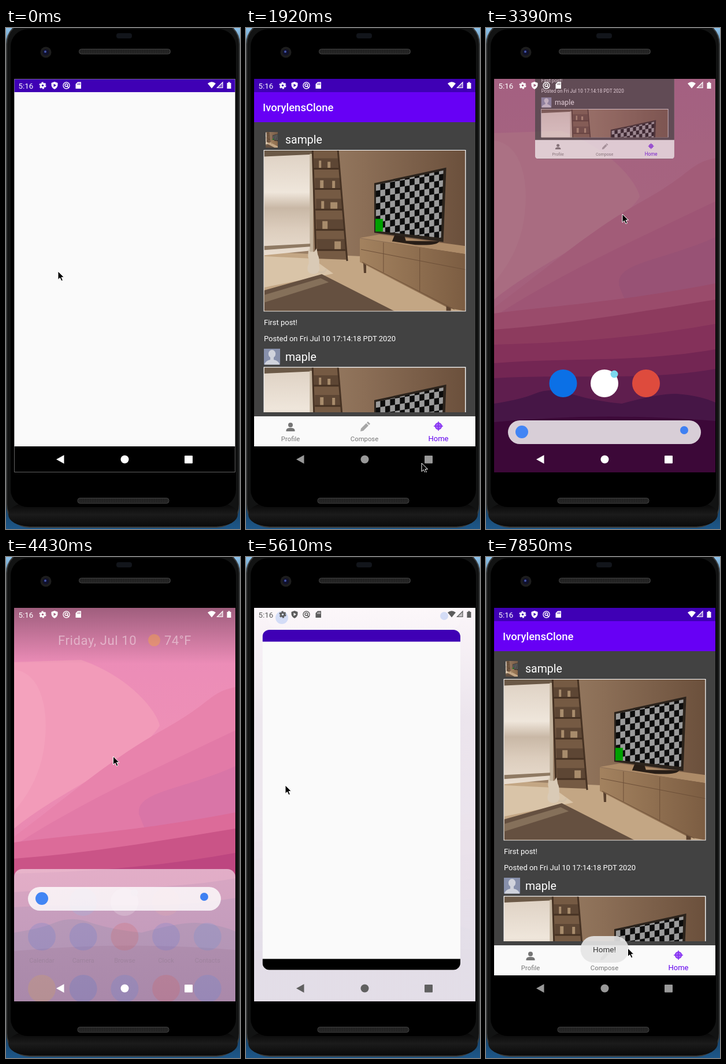
An HTML page for the animation above (8 s loop, 405 by 867 pixels).

```html
<!DOCTYPE html>
<html lang="en">
<head>
<meta charset="utf-8">
<title>Phone screen</title>
<style>
html, body { margin: 0; width: 100%; height: 100%; overflow: hidden; background: #000; }
svg { display: block; font-family: Roboto, sans-serif; }
svg.stage { width: 405px; height: 867px; }
.mid { text-anchor: middle; }
</style>
</head>
<body>
<svg class="stage" viewBox="0 0 405 867">
<defs>
  <linearGradient id="sky" x2="0" y2="1"><stop stop-color="#8fc4ec"/><stop offset=".1" stop-color="#23303a"/><stop offset=".9" stop-color="#14283a"/><stop offset="1" stop-color="#1d5789"/></linearGradient>
  <linearGradient id="chin" x2="0" y2="1"><stop stop-color="#060606"/><stop offset=".5" stop-color="#1b1b1b"/><stop offset="1" stop-color="#0a0a0a"/></linearGradient>
  <linearGradient id="pink" x2="0" y2="1"><stop stop-color="#ea8ab8"/><stop offset=".35" stop-color="#ee90b6"/><stop offset="1" stop-color="#e07aa8"/></linearGradient>
  <linearGradient id="shade" x2="0" y2="1"><stop stop-color="#000" stop-opacity=".32"/><stop offset="1" stop-color="#000" stop-opacity="0"/></linearGradient>
  <linearGradient id="sheet" x2="0" y2="1"><stop stop-color="#fff"/><stop offset=".25" stop-color="#ecebf1"/></linearGradient>
  <linearGradient id="glass" x2="0" y2="1"><stop stop-color="#ddd0c2"/><stop offset=".4" stop-color="#efe6db"/><stop offset=".55" stop-color="#c9b8a6"/><stop offset=".75" stop-color="#dccdbd"/><stop offset="1" stop-color="#e9ddcf"/></linearGradient>
  <linearGradient id="wall"><stop stop-color="#a38a70"/><stop offset=".5" stop-color="#8b6e56"/><stop offset="1" stop-color="#6b503c"/></linearGradient>
  <linearGradient id="wood"><stop stop-color="#a3825f"/><stop offset="1" stop-color="#7c5d42"/></linearGradient>
  <pattern id="check" x="193" y="60" width="17" height="22" patternUnits="userSpaceOnUse" patternTransform="skewY(-9) translate(0 30)">
    <path fill="#0c0c0c" d="M0 0H17V22H0z"/><path fill="#9b9b9b" d="M0 0H8.5V11H0zM8.5 11H17V22H8.5z"/>
  </pattern>
  <pattern id="mesh" width="3" height="3" patternUnits="userSpaceOnUse"><path fill="#1c1c1c" d="M0 0H3V3H0z"/><path fill="#3a3a3a" d="M0 0H1.5V1.5H0z"/></pattern>
  <clipPath id="screenClip"><path d="M14 88H397V769H14z"/></clipPath>
  <clipPath id="appClip"><rect id="appBox"/></clipPath>

  <symbol id="photo" viewBox="0 0 349 279" preserveAspectRatio="xMidYMid slice">
    <path fill="url(#wall)" d="M0 0H349V279H0z"/>
    <path fill="#c3a684" d="M0 176L168 184L349 262V279H0z"/>
    <path fill="#d9c4a8" d="M0 184L84 188L120 214L0 238z"/>
    <path fill="url(#glass)" d="M0 0H81V174L0 182z"/>
    <path fill="#6b5947" d="M0 0H84V7L0 11z"/>
    <path fill="#c2b29c" d="M79 6H85V184H79z"/>
    <path fill="#8f7a63" d="M0 166L80 162V167L0 173z"/>
    <path fill="#755a43" d="M84 0H128L144 190L90 188z"/>
    <path fill="#5d4634" d="M86 14H128L129 31H87zM88 48H132L133 66H88zM90 84H135L136 102H90zM90 120H138L139 137H91zM91 154H141L142 172H92z"/>
    <path fill="#a88c6c" d="M95 18h4v13h-4zM110 20h5v11h-5zM97 52h6v14h-6zM118 53h5v13h-5zM99 88h5v14h-5zM115 90h12v12h-12zM101 123h9v14h-9zM122 158h11v14h-11z"/>
    <path stroke="#463223" stroke-width="3" fill="none" d="M84 0L90 190M128 0L144 192M85 32H130M88 67H134M89 103H137M90 138H140M91 173H143"/>
    <path fill="#655040" d="M0 243L100 215L226 279H0z"/>
    <path fill="#85705a" d="M0 251L98 222L112 229L0 264z"/>
    <path fill="#ad8b68" d="M166 152L200 146L349 166V180z"/>
    <path fill="url(#wood)" d="M166 153L349 180V279L320 274L166 194z"/>
    <path stroke="#6d5039" fill="none" d="M168 172L349 207M207 160V212M270 170V245M170 194L330 276"/>
    <path fill="#5a412e" d="M172 196l5 3v14h-4zM316 270l8 4v5h-8z"/>
    <path fill="#271d16" d="M226 148L242 144L246 157L304 158Q300 166 262 164L222 158z"/>
    <path fill="#2b231c" d="M191 57L316 30L311 159L191 143z"/>
    <path fill="url(#check)" d="M194 60L311 35L307 152L194 140z"/>
    <path fill="#00a000" d="M193 119H206V141H193z"/>
    <path fill="#d9cab6" d="M77 170L80 176H87L91 170L93 181Q97 189 95 200Q99 213 86 215Q72 214 76 200Q79 194 76 184z"/>
    <path stroke="#d2c0a8" stroke-width="3" fill="none" d="M94 211Q104 214 108 206"/>
  </symbol>

  <g id="tabs">
    <path fill="#fafafa" d="M14 672H397V724H14z"/>
    <g fill="#757575">
      <circle cx="77" cy="687" r="4"/><path d="M69.5 698V696Q70 692 77 692T84.500 696V698z"/>
      <path fill="#a6a6a6" d="M198 698l1-5 9-9 4 4-9 9zM209 683l2-2 4 4-2 2z"/>
      <g class="mid" font-size="11.3"><text x="77" y="715">Profile</text><text x="205" y="715">Compose</text></g>
    </g>
    <circle cx="333" cy="689" r="5.500" fill="#a968fa" stroke="#8430f0" stroke-width="1.500"/>
    <path stroke="#8430f0" stroke-width="1.600" d="M333 681V697M325 689H341"/>
    <text class="mid" x="333" y="715" font-size="13" fill="#6200ee">Home</text>
  </g>
</defs>

<!-- phone body -->
<path fill="url(#sky)" d="M0 0H405V867H0z"/>
<rect x="1" y="-12" width="403" height="876" rx="40" fill="#121313" stroke="#3b3d3e" stroke-width="2"/>
<rect x="4" y="822" width="397" height="40" rx="34" fill="url(#chin)"/>
<rect x="8" y="2" width="390" height="827" rx="30" fill="#000"/>
<rect x="191" y="9" width="27" height="9" rx="4" fill="#12151b"/>
<g fill="url(#mesh)" stroke="#444"><rect x="126.500" y="36.500" width="158" height="8.500" rx="4"/><rect x="124" y="813.500" width="158" height="9" rx="4"/></g>
<circle cx="69" cy="42" r="9.500" fill="#1d1d1d"/><circle cx="69" cy="42" r="5.500" fill="#10112a"/><circle cx="68" cy="41" r="2" fill="#4453a8"/>

<g clip-path="url(#screenClip)">
  <!-- wallpaper -->
  <path fill="url(#pink)" d="M14 88H397V769H14z"/>
  <path fill="#f29bb9" d="M14 182L130 178C220 210 262 270 266 292C230 350 100 400 14 470z"/>
  <path fill="#f4a2bd" d="M14 195C60 200 72 260 68 310C64 370 40 410 14 440z"/>
  <path fill="#e883ac" d="M14 484C100 420 180 350 270 300S350 235 397 225V769H14z"/>
  <path fill="#e27aa7" d="M14 500C120 430 250 370 397 300V769H14z"/>
  <path fill="#d975a7" d="M230 445C225 405 300 405 397 362V470H240z"/>
  <path fill="#dc6b99" d="M14 494C120 480 220 476 397 442V769H14z"/>
  <path fill="#ca5487" d="M14 522C150 512 260 492 397 470V769H14z"/>
  <path fill="#bd4680" d="M14 548C120 545 240 540 397 512V769H14z"/>
  <path fill="#a53676" d="M14 580C130 570 260 580 397 556V769H14z"/>
  <path fill="#882b70" d="M14 606C140 598 270 612 397 590V769H14z"/>
  <path fill="#642064" d="M14 650Q60 643 84 633Q115 620 150 634Q190 646 235 650Q300 632 330 633Q370 636 397 648V769H14z"/>
  <path fill="#560c50" d="M14 682Q200 664 397 680V769H14z"/>
  <path id="dim" d="M14 88H397V769H14z"/>
  <path id="topShade" fill="url(#shade)" d="M14 88H397V185H14z"/>
  <g id="date" font-size="22" fill="#fff" fill-opacity=".85"><text x="90" y="152" letter-spacing=".6">Friday, Jul 10</text><circle cx="256.500" cy="144" r="10.500" fill="#f7a83c"/><text x="274" y="152" letter-spacing=".4">74°F</text></g>

  <!-- launcher -->
  <g id="dock"><circle cx="133.500" cy="615" r="24" fill="#0b70e6"/><circle cx="205" cy="615" r="24" fill="#fff"/><circle cx="222" cy="599" r="6.500" fill="#7cd8ee"/><circle cx="277" cy="615" r="24" fill="#de4b3d"/></g>
  <g id="drawer">
    <rect id="panel" x="14" y="648" width="383" height="900" rx="14" fill="url(#sheet)"/>
    <g id="icons" class="mid" font-size="11" fill="#555"></g>
    <g id="search"><rect x="38" y="679" width="334" height="41" rx="20.500" fill="#fff" fill-opacity=".8"/><circle cx="62" cy="699" r="11" fill="#4285f4"/><circle cx="343" cy="696" r="7" fill="#3f80f2"/></g>
  </g>

  <!-- app -->
  <g id="appShell" clip-path="url(#appClip)"><g id="app">
    <path fill="#fafafa" d="M14 88H397V769H14z"/>
    <g id="ui">
      <path fill="#424242" d="M14 160H397V724H14z"/>
      <path fill="#6700f5" d="M14 111H397V163H14z"/>
      <text x="29" y="143.500" font-size="18.500" font-weight="500" fill="#fff">IvorylensClone</text>
      <g id="posts" fill="#fff">
        <svg x="34" y="180" width="21" height="27"><use href="#photo"/></svg>
        <text x="68" y="200" font-size="19.500">sample</text>
        <path d="M30.500 211H380.500V490.500H30.500zM30.500 586.500H380.500V665H30.500z"/>
        <g font-size="13"><text x="31" y="514">First post!</text><text x="31" y="541.500">Posted on Fri Jul 10 17:14:18 PDT 2020</text></g>
        <path fill="#8790ab" d="M31 555H59V582.500H31z"/>
        <path fill="#d0d3dc" d="M32 582.500Q33 576 42 574V570Q38 567 39 562Q41 557 45 557T51 562Q52 567 48 570V574Q57 576 58 582.500z"/>
        <text x="68" y="575.500" font-size="19.500">maple</text>
        <g id="photos"><use href="#photo" x="31.500" y="212" width="348" height="277.500"/><svg x="31.500" y="587.500" width="348" height="77.500"><use href="#photo" width="348" height="277.500"/></svg></g>
      </g>
      <use href="#tabs"/>
    </g>
    <path fill="#3f00b5" d="M14 88H397V111H14z"/>
    <path d="M14 724H397V769H14z"/>
    <path id="edge" fill="none" stroke="#8c8c8c" stroke-opacity=".7" d="M14.500 88.500H396.500V768.500H14.500z"/>
  </g></g>
  <g id="toast"><rect x="163.500" y="656" width="83.500" height="46" rx="23" fill="#e6e6e6"/><text class="mid" x="205" y="684" font-size="13.500" fill="#222">Home!</text></g>

  <!-- system bars -->
  <g id="status">
    <text x="21.500" y="104.500" font-size="13.300">5:16</text>
    <circle cx="63.500" cy="99.500" r="3.200" fill="none" stroke="currentColor" stroke-width="2.800"/>
    <circle cx="63.500" cy="99.500" r="5.200" fill="none" stroke="currentColor" stroke-width="1.800" stroke-dasharray="3.200 2.245"/>
    <path fill-rule="evenodd" d="M84 93L89.500 95V99Q89 103.500 84 106Q79 103.500 78.500 99V95zM82.500 96.500V102L87 99.250z"/>
    <g fill="none" stroke="currentColor" stroke-width="1.400"><circle cx="104.500" cy="99.500" r="5.500"/><circle cx="104.500" cy="99" r="2.400"/><path d="M105 100L109 104"/></g>
    <path fill-rule="evenodd" d="M124 93.500H130V105H120.500V97zM123.500 96V98.500H124.500V96zM125.500 95.500V98.500H126.500V95.500zM127.500 95.500V98.500H128.500V95.500z"/>
    <path d="M349 96Q356 90.500 363 96L356 104.500z"/>
    <path d="M365.500 103.500H375V94z" fill-opacity=".35" stroke="currentColor" stroke-width="1.200"/>
    <path d="M384.500 93.500H387.500V95H389.500V105H382.500V95H384.500z"/>
  </g>
  <rect id="ripple" x="266" y="724" width="99" height="45" rx="22" fill="#fff"/>
  <g id="nav"><path d="M87 746.500L100.500 739V754z"/><circle cx="205.500" cy="746.500" r="7"/><rect x="309" y="740" width="14" height="13.500" rx="1"/></g>
  <path id="cursor" d="M0 0V14.500L3.400 11.400L5.900 16.800L8.400 15.700L6 10.400H10.400z" stroke="#fff"/>
</g>
</svg>

<script>
const LOOP = 8000, TICK = 147.5, LAST = 53;   // the screen refreshes once per tick
const $ = id => document.getElementById(id);
const set = (id, attrs) => { for (const k in attrs) $(id).setAttribute(k, attrs[k]); };
const fade = (id, v) => set(id, { opacity: v });
const show = (id, on) => $(id).style.display = on ? '' : 'none';

// linear interpolation through rows of [tick, ...values]
function at(t, rows) {
  const i = rows.findIndex(r => r[0] > t);
  if (i < 0) return rows[rows.length - 1].slice(1);
  if (i === 0) return rows[0].slice(1);
  const a = rows[i - 1], b = rows[i], k = (t - a[0]) / (b[0] - a[0]);
  return a.slice(1).map((v, j) => v + (b[j + 1] - v) * k);
}

const apps = `Calendar #3f6fe0,Camera #3f6fe0,Browse #de4b3d,Clock #4a6ee0,Contacts #4a90e2,
Cloud #f0b429,Call #2a6fe0,Files #3f7fe8,Mail #e34b3d,Search #4285f4,
IvorylensC… #3ddc84,Maps #34a853,Messages #0b70e6,Phone #1f73e8,Photos #f4b400,
Movies #e34b3d,Music #f57c00,Store #00a0c0,Settings #7a8288,Videos #e53935`.split(',');
$('icons').innerHTML = apps.map((app, i) => {
  const [name, color] = app.trim().split(' ');
  const x = 62 + i % 5 * 71.7, y = 765 + Math.floor(i / 5) * 90;
  return `<circle cx="${x}" cy="${y}" r="24" fill="${color}"/><text x="${x}" y="${y + 45}">${name}</text>`;
}).join('');

const cursor = [[0, 90, 421], [1, 105, 422], [4, 210, 408], [7, 295, 374], [8, 304, 325], [9, 304, 297],
  [10, 309, 380], [12, 305, 680], [13, 304, 753], [18, 304, 753], [19, 300, 715], [21, 240, 515],
  [22, 238, 430], [23, 236, 322], [24, 236, 270], [25, 234, 290], [27, 200, 590], [28, 195, 590],
  [29, 190, 470], [30, 185.5, 345], [31, 183, 240], [32, 180, 210], [35, 80, 390], [36, 68, 395],
  [39, 68, 395], [45, 175, 215], [47, 200, 400], [48, 167, 478], [49, 167, 478], [50, 250, 490],
  [51, 348, 560], [52, 305, 640], [53, 245.5, 677]];

// tick, window x, y, scale, clip x, y, w, h, radius, opacity
const windowPath = [
  [14, 14, 88, 1, 14, 88, 383, 681, 0, 1],
  [16, 61, 114, .754, 61, 123, 289, 485, 4, 1],
  [18, 77, 123, .671, 77, 135, 257, 418.5, 5, 1],
  [21, 77, 123, .671, 77, 135, 257, 418.5, 5, 1],
  [22, 79, 40, .66, 79, 52, 253, 410, 5, .92],
  [23, 85, -173.6, .629, 85, -162, 241, 388.500, 5, .68],
  [24, 88, -300, .61, 88, -290, 234, 378, 5, 0],
  [36, 44, 333, .1, 44, 333, 36, 36, 10, 0],
  [37, 36, 230, .45, 36, 230, 172, 230, 12, 1],
  [38, 28.5, 126, .8955, 28.5, 126, 342.5, 588.5, 12, 1],
  [39, 14, 88, 1, 14, 88, 383, 681, 0, 1]];

const searchY = [[14, 760], [17, 699], [28, 699], [29, 655], [30, 591], [31, 400], [32, 190], [33, 130], [35, 130], [36, 105]];
const levels = {
  dim: [[24, .3], [27, 0]],
  topShade: [[24, 0], [27, 1], [30, 1], [33, 0]],
  date: [[24, 0], [27, .95], [29, .9], [30, .5], [31, 0]],
  dock: [[14, 0], [17, 1], [28, 1], [30, .2], [31, 0]],
  panel: [[28, 0], [29, .35], [30, .56], [31, .85], [33, .94]],
  icons: [[29, 0], [30, .16], [32, 1], [36, 1], [38, 0]],
  search: [[36, 1], [38, .2]],
  ripple: [[14, 0], [15, .1], [18, .08], [20, 0]],
  toast: [[3, 0], [5, .94], [10, .94], [13, 0], [41, 0], [43, .94], [52, .94], [53, .9]]
};
const navTone = [[3, 255], [7, 176], [13, 153], [14, 153], [16, 255], [30, 255], [33, 96], [38, 96], [39, 255], [41, 255], [45, 180], [48, 153]];
const statusTone = [[30, 255], [33, 92], [38, 92], [39, 255]];
const gray = v => `rgb(${v},${v},${v})`;

function draw(t) {
  for (const id in levels) fade(id, at(t, levels[id])[0]);

  const y = at(t, searchY)[0] - 699;
  set('drawer', { transform: `translate(0 ${y})` });
  set('dock', { transform: `translate(0 ${y / 6})` });

  const [wx, wy, s, cx, cy, w, h, r, alpha] = at(t, windowPath);
  set('app', { transform: `matrix(${s} 0 0 ${s} ${wx - 14 * s} ${wy - 88 * s})` });
  set('appBox', { x: cx, y: cy, width: w, height: h, rx: r });
  fade('appShell', alpha);

  const shown = (first, second) => t >= second || (t >= first && t < 30);
  show('ui', shown(4, 42));
  show('posts', shown(6, 44));
  show('photos', shown(8, 45));
  show('edge', !shown(4, 42) && s === 1);

  set('nav', { fill: gray(at(t, navTone)[0]) });
  const tone = gray(at(t, statusTone)[0]);
  set('status', { fill: tone, color: tone });
  set('cursor', { transform: `translate(${at(t, cursor).join(' ')})` });
}

const start = performance.now();
function frame() {
  const ms = (performance.now() - start) % LOOP;
  draw(Math.min(LAST, Math.floor((ms + 8) / TICK)));
  requestAnimationFrame(frame);
}
frame();
</script>
</body>
</html>
```
